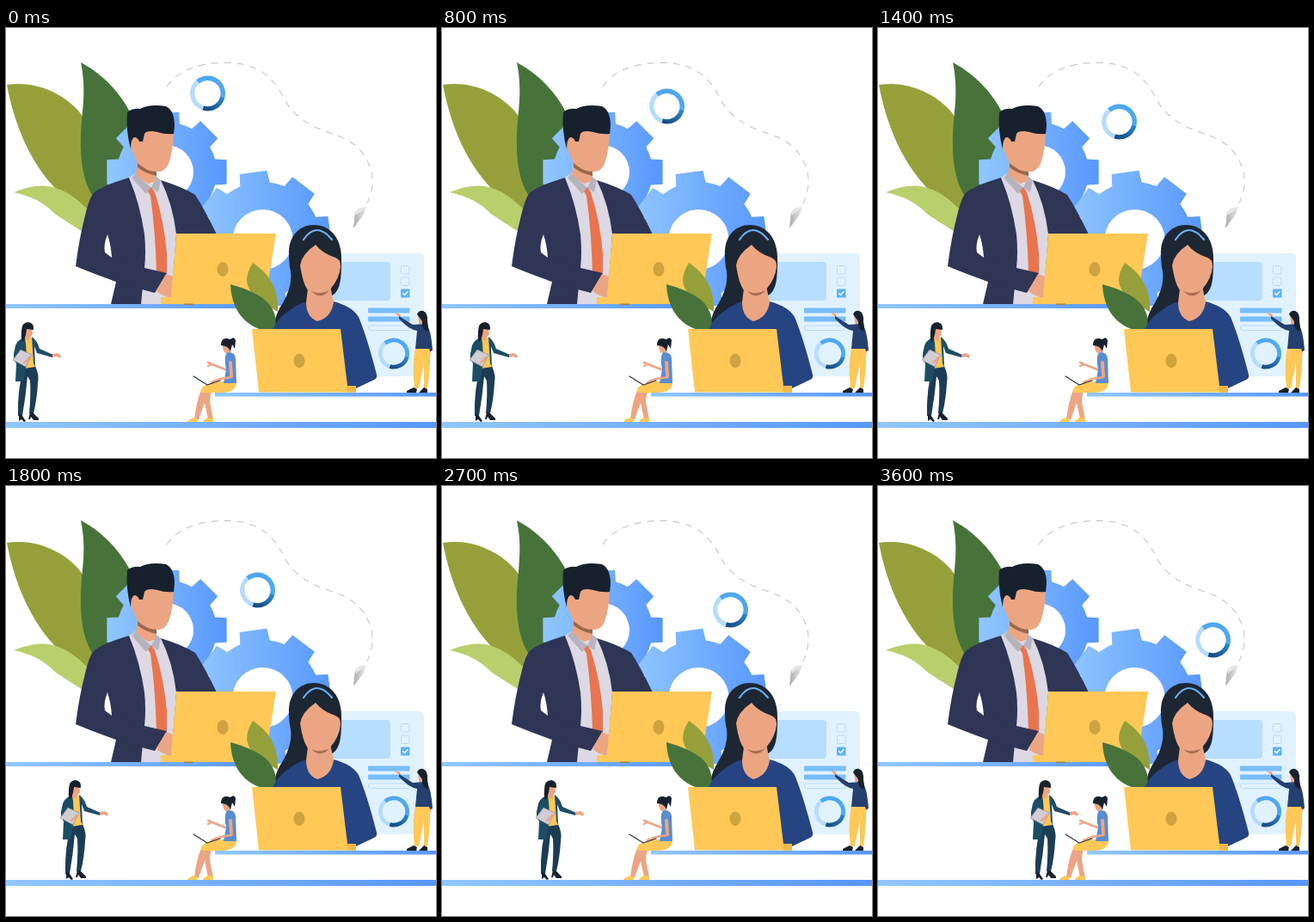
An HTML page for the animation above (3700 ms loop, 500x500 px).

```html
<!DOCTYPE html>
<html>
<head>
<meta charset="utf-8">
<style>
html, body { margin: 0; width: 100%; height: 100%; overflow: hidden; background: #fff; }
svg { display: block; width: 100vw; height: 100vh; }
.skin { fill: #eca583; }
.olive { fill: #96a03b; }
.green { fill: #47733a; }
.yellow { fill: #ffc857; }
.hair { fill: #17212e; }
.line { fill: none; stroke-linecap: round; stroke-linejoin: round; }
</style>
</head>
<body>
<svg viewBox="0 0 500 500">
  <defs>
    <linearGradient id="blue"><stop stop-color="#91c7ff"/><stop offset="1" stop-color="#5797fd"/></linearGradient>
    <linearGradient id="deep" x1="1" y1="0" x2="0" y2="1"><stop stop-color="#2e86cf"/><stop offset="1" stop-color="#164b80"/></linearGradient>
    <linearGradient id="paper"><stop stop-color="#aaa"/><stop offset="1" stop-color="#eee"/></linearGradient>
    <g id="donut" fill="none" stroke-width="5.4"></g>
  </defs>

  <!-- foliage -->
  <path class="olive" d="M1 66C32 61 64 74 84 96C108 125 116 165 101 217L95 213C82 207 68 198 55 184C25 151 9 108 1 66"/>
  <path fill="#b9cf6c" d="M9 191C37 180 62 177 96 212V241C78 230 67 223 57 216C44 203 31 196 9 191"/>
  <path class="green" d="M87 40C115 55 137 79 150 110L146 175L102 197C90 180 86 155 87 125C88 96 94 75 87 40"/>

  <!-- gears -->
  <path id="gearA" fill="url(#blue)" fill-rule="evenodd"/>
  <path id="gearB" fill="url(#blue)" fill-rule="evenodd"/>

  <!-- route and paper plane -->
  <path d="M187 68C201 46 235 38 268 41C300 45 314 63 324 83C335 104 355 115 380 123C405 131 420 146 425 168C428 182 424 194 420 204" fill="none" stroke="#c6c6c6" stroke-width="1.1" stroke-dasharray="8 7"/>
  <path d="M404 233L406 214L419 208L416 217Z" fill="url(#paper)"/>
  <path d="M406 214L411 209L419 208L407 218Z" fill="#e6e6e6"/>

  <!-- dashboard -->
  <rect x="370" y="262" width="116" height="143" rx="5" fill="#e1f2ff"/>
  <rect x="370" y="272" width="77" height="45" rx="4" fill="#b7ddff"/>
  <g fill="none" stroke="#b7dcfb">
    <rect x="459.500" y="276.500" width="9.500" height="9.500" rx="1"/>
    <rect x="459.500" y="290" width="9.500" height="9.500" rx="1"/>
    <rect x="421.500" y="346" width="47.500" height="5.500" rx="2"/>
  </g>
  <g fill="#78bdfa">
    <rect x="459" y="303.500" width="10.500" height="10" rx="1" fill="#5db2f7"/>
    <rect x="421" y="325.500" width="48.500" height="6" rx="1"/>
    <rect x="421" y="335.500" width="48.500" height="6" rx="1"/>
  </g>
  <path class="line" stroke="#fff" stroke-width="1.300" d="M461.500 308.500L463.500 310.500L467 306.500"/>
  <use href="#donut" transform="translate(451 378.500) scale(.88)"/>

  <!-- platforms -->
  <rect y="321" width="300" height="5" fill="url(#blue)"/>
  <rect x="243" y="424" width="257" height="4.500" fill="url(#blue)"/>
  <rect y="458" width="500" height="7" fill="url(#blue)"/>

  <!-- man at laptop -->
  <path fill="#2e3555" d="M143 174Q110 184 102 192Q97 197 92 218Q85 245 81 277Q100 285 128 295L122 321H200L245 240Q231 211 220 194Q206 185 180 177Z"/>
  <path fill="#fff" d="M118 240Q113 252 115 261L123 267Q122 252 118 240"/>
  <path fill="#dcd9e4" d="M143 174Q156 205 161 240Q163 260 161 279L157 321H192L198 240Q194 205 180 177L150 169Z"/>
  <path class="skin" d="M153 155L151 172L165 181L175 178V160Z"/>
  <path fill="#b5b4be" d="M150 169L146 174L163 193L169 186ZM175 173L180 177L177 191L169 186Z"/>
  <path fill="#e9744e" d="M165 190L169 185L173 191Q184 225 187 262L187 288L175 286Q174 240 168 195Z"/>
  <path fill="#2e3555" d="M123 266L161 279L187 285L173 308Q145 301 123 293Z"/>
  <path class="skin" d="M186 286L194 289L192 314Q183 312 175 306Z"/>
  <path class="skin" d="M146 141Q144 128 151 126L163 117H195Q195 141 189 158Q184 168 176 167Q163 166 153 157Z"/>
  <path fill="#9a674b" d="M153 157Q164 167 175 167V172Q161 169 153 162Z"/>
  <path class="hair" d="M145 141Q139 118 141 98Q147 93 156 94Q167 88 186 91Q196 96 196 114L195 123Q185 124 176 121Q164 118 161 123L159 132H155Q153 127 149 127Q145 129 145 141"/>
  <path class="yellow" d="M198 239H314L301 321H180V313H192Z"/>
  <path fill="#9b8243" d="M207 320.500H218V322H207Z"/>
  <ellipse cx="252" cy="280.500" rx="6.500" ry="8.500" fill="#cfa33f"/>

  <!-- woman at laptop -->
  <path fill="#1d2633" d="M329 264C328 242 341 229 358 229C378 229 391 246 390 270C390 293 389 311 373 313L340 352H311Q312 337 318 326C327 312 333 298 331 283Q329 275 329 264"/>
  <path class="olive" d="M287 273Q318 293 316 330L304 323Q281 309 280 294Q280 284 287 273"/>
  <path class="green" d="M261 298Q287 305 301 316Q317 330 313 351H297C273 343 262 323 261 298"/>
  <path fill="#264481" d="M310 350Q317 336 330 328Q342 319 350 318L381 318Q403 324 410 336Q420 360 431 403Q432 407 428 409L407 419H380Z"/>
  <path class="skin" d="M352 295L349 319Q349 336 362 341Q378 337 381 319L377 300Z"/>
  <path class="skin" d="M360 252Q344 263 342 276Q345 297 351 305Q364 317 377 304Q388 291 389 277Q389 269 383 267Q368 262 360 252"/>
  <path fill="#a66d51" d="M355 306Q366 311 376 305Q366 317 355 306"/>
  <path class="line" stroke="#68b2fa" stroke-width="2.200" d="M346 246Q361 224 379 246"/>
  <path class="yellow" d="M286 350H389L397 416H407V423.500H294Z"/>
  <path fill="#efb745" d="M396 416H407V423.500H397Z"/>
  <ellipse cx="341" cy="387" rx="6.500" ry="8.300" fill="#cfa33f"/>

  <!-- presenter -->
  <path class="skin" d="M452 331L457 332L460 336L458 337ZM479 334H486V347H481Z"/>
  <path class="line" stroke="#eca583" stroke-width="2.500" d="M494 374L491 381"/>
  <path class="yellow" d="M476 371L493 372Q494 394 490 419H486L486 388L480 419H475Q472 394 476 371"/>
  <path fill="#25406f" d="M457 335L473 345L488 344Q494 348 496 375L493 376L492 373H476L478 352Q469 351 457 338Z"/>
  <path class="hair" d="M478 333Q480 328 485 329Q491 331 490 342Q492 349 490 353Q483 350 484 341ZM474 418L478 420L477 424H466V422ZM486 418L490 420V424H480Z"/>

  <!-- seated woman -->
  <path class="line" stroke="#eca583" stroke-width="2.500" d="M255 397L242 392L235 389M239 391L235 393"/>
  <path class="skin" d="M227 421L239 422Q237 430 237 435L241 455H235L231 436L224 455H219Q221 436 227 421"/>
  <path class="yellow" d="M253 411L268 413Q267 424 250 424H228Q225 422 229 417Q237 411 253 411M219 453L224 455L222 458H211Q212 455 219 453M235 453L241 454L241 458H229Q230 455 235 453"/>
  <path fill="#5b8cd0" d="M257 377Q266 376 267 384L268 413H253L256 397Q253 383 257 377"/>
  <path class="skin" d="M252 367H261V377L255 378Q251 373 252 367"/>
  <path class="hair" d="M250 369Q250 360 257 361L261 362Q265 358 267 363L266 373L263 368L261 376Q258 369 250 369"/>
  <path class="line" stroke="#eca583" stroke-width="4" d="M261 389L262 405"/>
  <path class="line" stroke="#eca583" stroke-width="2.500" d="M262 406L249 408L239 412"/>
  <path class="line" stroke="#2c3548" stroke-width="1.300" d="M218 405L234 415L249 410"/>

  <!-- walking woman -->
  <g id="walker">
    <path fill="#1c3c56" d="M21 393H34Q39 404 37 413Q36 432 32 448H27Q29 427 28 410L25 405Q23 428 19 451H14Q13 420 21 393"/>
    <path class="yellow" d="M22 360H31L34 394L21 396Z"/>
    <path fill="#1d4d65" d="M22 359Q11 363 10 374Q7 384 12 390L11 411H20L23 396Q25 378 22 359M30 359Q36 363 39 373L55 380L54 383L36 378L33 370L34 394L32 390Z"/>
    <path class="skin" d="M22 350L30 348L31 356L28 360L27 364L22 361ZM54 379L60 378L64 381L63 384L59 382L54 383Z"/>
    <path fill="#d2ccd5" stroke="#87818e" stroke-width=".6" d="M17 374L30 380L23 394L8 386Z"/>
    <path class="line" stroke="#eca583" stroke-width="2.500" d="M21 389L25 386L27 383"/>
    <path class="hair" d="M18 353Q18 342 26 342Q33 343 32 351L24 350Q23 361 19 365Q17 359 18 353M15 449L19 451L23 457L21 458L18 455L15 457ZM28 447L32 448L38 454V456H32L29 452L28 455H26Z"/>
  </g>
  <use id="ring" href="#donut"/>
</svg>
<script>
const $ = id => document.getElementById(id);
const polar = (r, deg) => [r * Math.cos(deg * Math.PI / 180), r * Math.sin(deg * Math.PI / 180)];

function gear(id, cx, cy, base, tip, hole, phase) {
  let d = '';
  const at = (r, deg) => {
    const [x, y] = polar(r, deg);
    return (cx + x).toFixed(1) + ' ' + (cy + y).toFixed(1);
  };
  for (let i = 0; i < 8; i++) {
    const a = phase + i * 45;
    d += `${i ? `A${base} ${base} 0 0 1 ` : 'M'}${at(base, a - 15)}L${at(tip, a - 11.5)}L${at(tip, a + 11.5)}L${at(base, a + 15)}`;
  }
  d += `A${base} ${base} 0 0 1 ${at(base, phase - 15)}ZM${cx - hole} ${cy}`;
  d += `a${hole} ${hole} 0 1 0 ${2 * hole} 0a${hole} ${hole} 0 1 0 ${-2 * hole} 0Z`;
  $(id).setAttribute('d', d);
}
gear('gearA', 187, 167.5, 58, 71, 31, 0);
gear('gearB', 298.5, 246, 67, 80.5, 35, -8);

const arc = (from, to, color) =>
  `<path stroke="${color}" d="M${polar(17.8, from)}A17.8 17.8 0 0 1 ${polar(17.8, to)}"/>`;
$('donut').innerHTML = arc(105, 232, '#b5dcfe') + arc(230, 377, '#4fa8f0') + arc(375, 467, 'url(#deep)');

// Keys: [step, x, y]
const walk = [[0, 0, 0], [18, 55, 0], [24, 85, 0], [27, 101, 0], [30, 122, 0], [36, 169, 0]];
const drift = [[0, 0, 0], [6, 21, 9], [18, 58, 45], [22, 71, 51], [24, 85, 59], [27, 101, 68], [30, 123, 75], [31, 129, 81], [36, 155, 103]];

function place(id, keys, step, x0, y0) {
  const i = Math.max(1, keys.findIndex(k => k[0] >= step));
  const [a, b] = [keys[i - 1], keys[i]];
  const p = (step - a[0]) / (b[0] - a[0]);
  const mix = n => a[n] + (b[n] - a[n]) * p;
  $(id).setAttribute('transform', `translate(${x0 + Math.round(mix(1))} ${y0 + Math.round(mix(2))})`);
}

function draw() {
  const step = Math.floor(performance.now() % 3700 / 100);
  place('walker', walk, step, 0, 0);
  place('ring', drift, step, 234.5, 76);
  requestAnimationFrame(draw);
}
draw();
</script>
</body>
</html>
```
